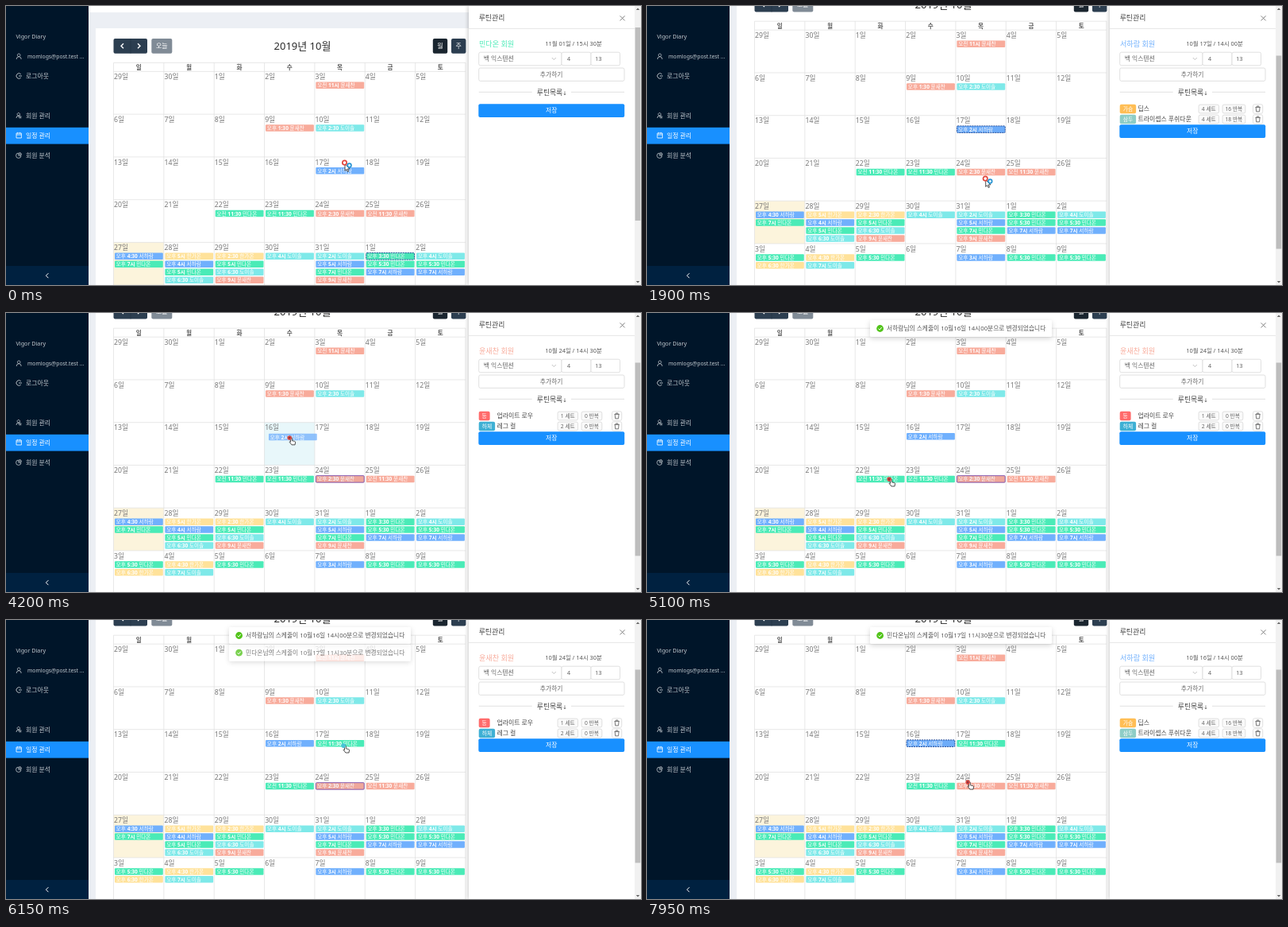
Animation of 800x351 px, one loop 8000 ms. Source, as an HTML page:

```html
<!DOCTYPE html>
<html lang="ko">
<head>
<meta charset="utf-8">
<title>일정 관리</title>
<style>
  html, body { margin: 0; width: 100%; height: 100%; overflow: hidden; background: #fff; }
  svg { display: block; width: 800px; height: 351px; }
  text { font-family: 'Noto Sans', 'Noto Sans CJK KR', 'Noto Sans CJK', sans-serif; white-space: pre; }
  .arrow { font-family: 'DejaVu Sans', sans-serif; font-size: 6.5px; }
</style>
</head>
<body>
<svg id="stage" viewBox="0 0 800 351" xmlns="http://www.w3.org/2000/svg"></svg>
<script>
const LOOP = 8000, COL = 63.35, ROW = 53.75, LEFT = 135.5, TOP = 82.4;

const members = {
  H: ['윤새찬', '#f8ab9b'], P: ['서하람', '#70b0fd'], G: ['민다온', '#4aebb7'],
  K: ['도이솔', '#7ee9e9'], Y: ['한가온', '#ffe29a']
};

// Cell index -> events: a/p for morning/afternoon, time, member key
const schedule = {
  4: 'a11시H', 10: 'p1:30H', 11: 'p2:30K', 24: 'a11:30G', 25: 'p2:30H', 26: 'a11:30H',
  28: 'p4:30P p7시G', 29: 'p5시Y p4시P p5시G p6:30K', 30: 'p2:30Y p5시G p6:30K p9시H',
  31: 'p4시K', 32: 'p2시K p5시P p7시G p9시H', 33: 'p3:30G p5:30G p7시P', 34: 'p4시K p5:30G p7시P',
  35: 'p5:30G p6:30Y', 36: 'p4:30Y p7시K', 37: 'p5:30G', 39: 'p3시P', 40: 'p5:30G', 41: 'p5:30G'
};

const rect = (x, y, w, h, fill, extra = '') =>
  `<rect x="${x}" y="${y}" width="${w}" height="${h}" fill="${fill}" ${extra}/>`;
const text = (x, y, s, size, fill, extra = '') =>
  `<text x="${x}" y="${y}" font-size="${size}" fill="${fill}" ${extra}>${s}</text>`;
const line = (d, color, width = 1, extra = '') =>
  `<path d="${d}" fill="none" stroke="${color}" stroke-width="${width}" ${extra}/>`;
const disc = (x, y, r, fill, extra = '') => `<circle cx="${x}" cy="${y}" r="${r}" fill="${fill}" ${extra}/>`;
const MID = 'text-anchor="middle"', BOLD = 'font-weight="700"';
const framed = (x, y, w, h, fill = '#fff') => rect(x, y, w, h, fill, 'rx="2" stroke="#d9d9d9" stroke-width=".8"');

const cellX = i => LEFT + (i % 7) * COL;
const cellY = i => TOP + Math.floor(i / 7) * ROW;
const eventPos = (i, n = 0) => [cellX(i) + 1.5, cellY(i) + 13.2 + n * 9.95];

function eventBar(code) {
  const [name, color] = members[code.at(-1)];
  const half = code[0] === 'a' ? '오전' : '오후';
  return rect(0, 0, 60.8, 8.5, color, 'rx="1"') +
    text(1.8, 6.7, `${half} <tspan ${BOLD}>${code.slice(1, -1)}</tspan> ${name}`, 6.6, '#fff');
}
const group = (id, body, extra = '') => `<g id="${id}" ${extra}>${body}</g>`;
const placed = (pos, body) => `<g transform="translate(${pos})">${body}</g>`;

function toolbar() {
  return rect(135.5, 41, 42.5, 18.7, '#2c3e50', 'rx="2"') +
    line('M148 47.3l-3 3 3 3M166 47.3l3 3-3 3', '#fff', 1.4) +
    line('M157 41v18.7', '#233342', .6) +
    rect(183.3, 41, 26, 18.7, '#808b96', 'rx="2"') + text(196.3, 53.4, '오늘', 8, '#fff', MID) +
    text(373.5, 55.1, '2019년 10월', 13, '#2b2b2b', MID + ' font-weight="500"') +
    rect(537.8, 41, 18.4, 18.7, '#1a252f', 'rx="2"') + text(547, 53.4, '월', 8, '#fff', MID) +
    rect(561, 41, 18.4, 18.7, '#2c3e50', 'rx="2"') + text(570.2, 53.4, '주', 8, '#fff', MID);
}

function calendar() {
  let out = rect(LEFT, cellY(28), COL, ROW, '#fcf4dc');
  out += group('target', rect(0, 0, COL, ROW, '#bce8f1', 'opacity=".35"'));
  let grid = `M${LEFT} 71.4h${COL * 7}`;
  for (let r = 0; r < 7; r++) grid += `M${LEFT} ${TOP + r * ROW}h${COL * 7}`;
  for (let c = 0; c < 8; c++) grid += `M${LEFT + c * COL} 71.4V${TOP + 6 * ROW}`;
  out += line(grid, '#dedede', .7);
  [...'일월화수목금토'].forEach((d, c) => out += text(LEFT + (c + .5) * COL, 80.3, d, 7.6, '#555', MID + ' ' + BOLD));
  for (let i = 0; i < 42; i++) {
    const day = i < 2 ? 29 + i : i < 33 ? i - 1 : i - 32;
    out += text(cellX(i) + .6, cellY(i) + 9.8, day + '일', 8.7, '#777');
  }
  for (const i in schedule)
    schedule[i].split(' ').forEach((code, n) => out += placed(eventPos(i, n), eventBar(code)));
  return out + group('meeting', eventBar('p2시P')) + group('training', eventBar('a11:30G')) +
    group('focus', rect(0, 0, 60.8, 8.5, '#2a4ea0', 'fill-opacity=".04" rx="1" stroke-width=".9"'));
}

function sidebar() {
  const label = (y, s, color = '#c3c9cf') => text(25, y + 3, s, 7.9, color);
  return rect(0, 0, 104, 351, '#001529') + rect(0, 327, 104, 24, '#002140') +
    rect(0, 152.8, 104, 20.8, '#1890ff') +
    text(12.5, 41, 'Vigor Diary', 7.2, '#c3c9cf') +
    text(27, 66, 'momlogs@post.test ...', 6.8, '#c3c9cf') +
    line('M13.2 67q0-3.3 3-3.3t3 3.3M16.2 60a1.8 1.8 0 1 1-.01 0', '#c3c9cf', .8) +
    label(88, '로그아웃') + line('M18.7 85.7a3.3 3.3 0 1 0 0 4.6M16 88h4', '#c3c9cf', .9) +
    label(138, '회원 관리') + line('M13 141q0-3 2.8-3l3.4 3.2M15.8 134.5a1.7 1.7 0 1 1-.01 0M17.5 138a1.5 1.5 0 1 1-.01 0', '#c3c9cf', .8) +
    label(163, '일정 관리', '#fff') + line('M13 160h6.4v6H13zM13 162h6.4M14.8 158.8v2M17.6 158.8v2', '#fff', .8) +
    label(188, '회원 분석') + line('M15.8 185a3.2 3.2 0 1 0 3.2 3.2h-3.2zM17 184.4a3 3 0 0 1 2.6 2.6H17z', '#c3c9cf', .8) +
    line('M53.4 336.2l-3 3 3 3', '#fff', 1);
}

const listB = [['가슴', '#ffbe55', '딥스', 4, 16], ['삼두', '#8ecdc6', '트라이셉스 푸쉬다운', 4, 18]];
const listC = [['등', '#ff6b6b', '업라이트 로우', 1, 0], ['하체', '#3fb0d4', '레그 컬', 2, 0]];
const bookings = [
  ['G', '11월 01일 / 15시 30분', []],
  ['P', '10월 17일 / 14시 00분', listB],
  ['H', '10월 24일 / 14시 30분', listC],
  ['P', '10월 16일 / 14시 00분', listB]
];

function booking([who, date, list], k) {
  const [name, color] = members[who];
  let out = text(596, 50.6, name + ' 회원', 9.1, color) + text(715, 50, date, 7.4, '#555', MID);
  list.forEach(([part, tint, title, sets, reps], n) => {
    const y = 123.8 + n * 13, w = part.length * 6.5 + 7.4, wide = reps > 9 ? 3 : 0;
    out += rect(595.7, y, w, 11.4, tint, 'rx="2"') + text(595.7 + w / 2, y + 8.2, part, 6.7, '#fff', MID) +
      text(618.5, y + 8.6, title, 7.9, '#444') +
      framed(695, y + .3, 25.5, 10.8, '#fafafa') + text(707.8, y + 8.2, sets + ' 세트', 6.7, '#666', MID) +
      framed(725, y + .3, 25.8 + wide, 10.8, '#fafafa') +
      text(737.9 + wide / 2, y + 8.2, reps + ' 반복', 6.7, '#666', MID) +
      framed(763.5, y, 12.2, 11.4) +
      line(`M766.4 ${y + 3.6}h6.4M768.4 ${y + 3.4}v-1.2h2.4v1.2M767.2 ${y + 3.8}l.4 5.2h4l.4-5.2`, '#555', .8);
  });
  const y = list.length ? 149.2 : 123.2;
  out += rect(595.3, y, 183.9, 16.8, '#1890ff', 'rx="2"') + text(687.2, y + 11.2, '저장', 7.8, '#fff', MID);
  return group('booking' + k, out);
}

function panel() {
  return rect(583, 0, 209, 351, '#fff', 'filter="url(#drawer)"') +
    text(595.7, 17.6, '루틴관리', 8.9, '#444') + line('M583 28.5h209', '#e8e8e8') +
    line('M773.6 12.4l6 6m0-6l-6 6', '#777', .9) +
    framed(595.7, 58.2, 104.3, 16.6) + framed(700, 58.2, 37, 16.6) + framed(737, 58.2, 36.5, 16.6) +
    text(601.8, 69.3, '백 익스텐션', 7.8, '#666') + line('M687.8 65l2.5 2.6 2.5-2.6', '#bbb', .9) +
    text(706.8, 69.2, '4', 7.6, '#666') + text(742, 69.2, '13', 7.6, '#666') +
    framed(595.7, 78, 183.3, 16.4) + text(687.2, 89.1, '추가하기', 7.8, '#666', MID) +
    line('M595.7 108.3h67M712 108.3h67', '#e0e0e0') +
    text(668.8, 111.6, '루틴목록<tspan class="arrow">↓</tspan>', 8.8, '#444') +
    bookings.map(booking).join('') +
    rect(792, 0, 8, 351, '#f1f1f1') + `<path d="M793.8 5l2.2-2.6L798.2 5zM793.8 346l2.2 2.6 2.2-2.6z" fill="#666"/>` +
    group('thumb', rect(792.6, 27, 6.6, 243, '#bdbdbd'));
}

const toast = (id, s) => group(id,
  rect(281, 9, 229, 21, '#fff', 'rx="2" filter="url(#soft)"') + disc(293.6, 19.5, 4.4, '#52c41a') +
  line('M291.6 19.6l1.5 1.6 2.6-3.2', '#fff', 1) + text(302, 22.4, s, 7.75, '#555'));

function pointer() {
  const ink = 'fill="#fff" stroke="#222" stroke-width=".8" stroke-linejoin="round"';
  return group('hand', `<path ${ink} d="M0 1q0-1 .9-1t.9 1v3.2l3.2.7q1 .3 1 1.3L5.5 9.4H1.4L-1.3 6q0-1 1-.6l.3.4z"/>` +
      disc(-1.4, .5, 2.8, '#dd4a42', 'id="mark"') + disc(-1.4, .5, 1.3, '#8c3340', 'id="core"')) +
    group('busy', `<path ${ink} d="M0 0v8.6l2-1.8 1.4 3 1.4-.6-1.4-3h2.8z"/>` +
      disc(-.5, -1.6, 2.7, '#fff', 'stroke="#e2453c" stroke-width="1.7"') +
      disc(5.6, 1.8, 2.4, '#d8f0fb', 'stroke="#1f8fd0" stroke-width="1.5"'));
}

stage.innerHTML = `<defs>
  <filter id="soft" x="-10%" y="-50%" width="120%" height="220%"><feDropShadow dx="0" dy="2" stdDeviation="3" flood-opacity=".17"/></filter>
  <filter id="drawer" x="-10%" width="120%"><feDropShadow dx="-1.5" dy="0" stdDeviation="2" flood-opacity=".18"/></filter>
  </defs>` +
  rect(0, 0, 800, 351, '#fff') +
  group('page', rect(104, 8, 480, 400, '#eceff4') + rect(113, 28, 471, 400, '#fff') + toolbar() + calendar()) +
  sidebar() + panel() +
  toast('toast1', '서하람님의 스케줄이 10월16일 14시00분으로 변경되었습니다') +
  toast('toast2', '민다온님의 스케줄이 10월17일 11시30분으로 변경되었습니다') +
  group('pointer', pointer());

const el = id => document.getElementById(id);
const move = (id, x, y) => el(id).setAttribute('transform', `translate(${x} ${y})`);
const show = (id, opacity) => { el(id).style.opacity = +opacity; };
const ramp = (t, from, to) => {
  const p = Math.min(1, Math.max(0, (t - from) / (to - from)));
  return p * p * (3 - 2 * p);
};
const step = (table, t) => table.findLast(row => row[0] <= t);

const path = [
  [0, 427, 198.7], [250, 427, 198.7], [600, 425.9, 205.5], [1420, 425.9, 205.5], [1800, 426.7, 218.7],
  [2300, 426.7, 218.7], [2600, 425.4, 210.6], [3300, 425.4, 210.6], [3650, 418, 155.5], [3850, 418, 155.5],
  [4250, 356, 156.5], [4550, 356, 156.5], [4950, 306.5, 208.6], [5150, 306.5, 208.6], [5800, 426.5, 157.6],
  [6350, 426.5, 157.6], [6750, 357, 155], [7300, 357, 155], [7750, 405.5, 203.6], [LOOP, 405.5, 203.6]
];
function pointerAt(t) {
  const n = path.findLastIndex(p => p[0] <= t), a = path[n], b = path[n + 1];
  const p = ramp(t, a[0], b[0]);
  return [a[1] + (b[1] - a[1]) * p, a[2] + (b[2] - a[2]) * p];
}

const shapes = [[0, 'busy'], [450, 'hand'], [1550, 'busy'], [2450, 'hand']];
const panels = [[0, 0], [800, 1], [2850, 2], [7100, 3]];
const focusSteps = [
  [0, 33, '#17408f', '2 1'], [850, 18, '#2f5fc0', ''], [1500, 18, '#17408f', '2 1'],
  [2700, 25, '#7a4fae', ''], [6950, 17, '#17408f', '2 1']
];
const drags = [
  { id: 'meeting', from: 18, to: 17, start: 3850, end: 4350 },
  { id: 'training', from: 23, to: 18, start: 5150, end: 5950 }
];

function draw(t) {
  const scroll = 52.2 * ramp(t, 1480, 1750), [px, py] = pointerAt(t);
  move('page', 0, -scroll);
  move('thumb', 0, scroll * .68);
  move('pointer', px, py);

  const shape = step(shapes, t)[1];
  show('hand', shape === 'hand');
  show('busy', shape === 'busy');
  const released = drags.some(d => t >= d.end && t < d.end + 270);
  el('mark').setAttribute('fill', released ? '#48c4d8' : '#dd4a42');
  show('core', !released);

  const current = step(panels, t)[1];
  bookings.forEach((_, k) => show('booking' + k, k === current));

  const [, cell, color, dash] = step(focusSteps, t);
  move('focus', ...eventPos(cell));
  el('focus').setAttribute('stroke', color);
  el('focus').setAttribute('stroke-dasharray', dash);

  show('target', 0);
  for (const d of drags) {
    const dragging = t >= d.start && t < d.end;
    let [x, y] = eventPos(t < d.end ? d.from : d.to);
    if (dragging) {
      const [sx, sy] = pointerAt(d.start);
      x += px - sx;
      y += py - sy;
      const c = Math.floor((px - LEFT) / COL), r = Math.floor((py + scroll - TOP) / ROW);
      move('target', LEFT + c * COL, TOP + r * ROW);
      show('target', 1);
    }
    move(d.id, x, y);
    show(d.id, dragging ? .75 : 1);
  }

  const in1 = ramp(t, 4430, 4680), out1 = ramp(t, 7450, 7700);
  show('toast1', in1 * (1 - out1));
  move('toast1', 0, -12 * (1 - in1) - 12 * out1);
  show('toast2', ramp(t, 6000, 6220));
  move('toast2', 0, 21.7 * (1 - ramp(t, 7600, 7800)));
}

const begin = performance.now();
(function tick() {
  draw((performance.now() - begin) % LOOP);
  requestAnimationFrame(tick);
})();
</script>
</body>
</html>
```
